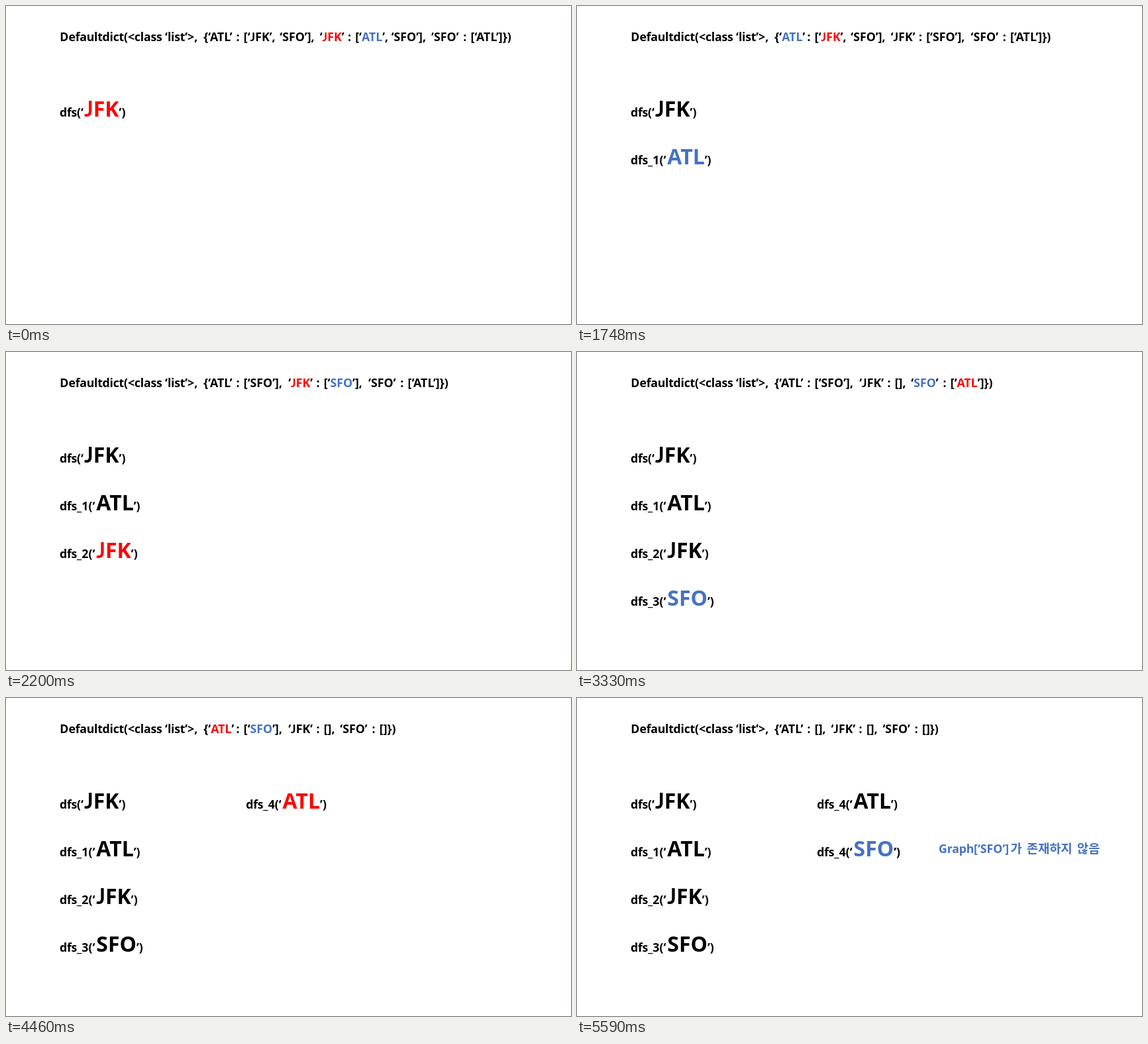
Write an HTML page with a canvas that moves like this. It is 853 px wide and 480 px high and loops after 6720 ms.

```html
<!DOCTYPE html>
<html lang="ko">
<head>
<meta charset="utf-8">
<title>DFS trace</title>
<style>
  html, body { margin: 0; width: 100%; height: 100%; overflow: hidden; background: #fff; }
  canvas { display: block; }
</style>
</head>
<body>
<canvas id="stage" width="853" height="480"></canvas>
<script>
const ctx = document.getElementById("stage").getContext("2d");
const LOOP = 6720, FIRST = 1070, STEP = 1130;
const SMALL = 17.78, BIG = 32;
const BLACK = "#000", RED = "#f00", BLUE = "#4472c4";
const INK = { "~": RED, "^": BLUE };

// "~" marks a red code and "^" a blue one.
const HEAD = "Defaultdict(<class ‘list’>, ";
const graphs = [
  "{‘ATL’ : [‘JFK’, ‘SFO’], ‘~JFK’ : [‘^ATL’, ‘SFO’], ‘SFO’ : [‘ATL’]})",
  "{‘^ATL’ : [‘~JFK’, ‘SFO’], ‘JFK’ : [‘SFO’], ‘SFO’ : [‘ATL’]})",
  "{‘ATL’ : [‘SFO’], ‘~JFK’ : [‘^SFO’], ‘SFO’ : [‘ATL’]})",
  "{‘ATL’ : [‘SFO’], ‘JFK’ : [], ‘^SFO’ : [‘~ATL’]})",
  "{‘~ATL’ : [‘^SFO’], ‘JFK’ : [], ‘SFO’ : []})",
  "{‘ATL’ : [], ‘JFK’ : [], ‘SFO’ : []})"
];

// Distance from the start of one word to the next.
const advance = {
  "Defaultdict(<class": 158.8, "‘list’>,": 58.2, "{‘ATL’": 49.2, ":": 11.3,
  "[‘JFK’,": 54.5, "[‘ATL’,": 54.5, "‘SFO’],": 60.4, "[‘SFO’],": 67.4,
  "‘JFK’": 42.2, "‘SFO’": 48.2, "[],": 24.6
};

const calls = [
  ["dfs", "JFK"], ["dfs_1", "ATL"], ["dfs_2", "JFK"],
  ["dfs_3", "SFO"], ["dfs_4", "ATL"], ["dfs_4", "SFO"]
];

// Draws a run and returns its end. Lowercase is set slightly tight;
// J takes a face whose hook rests on the baseline.
function write(text, x, y, size, color) {
  ctx.fillStyle = color;
  for (const part of text.split(/(J|[a-z]+)/)) {
    const face = part === "J" ? "Lato" : '"Open Sans", "Noto Sans"';
    ctx.font = `700 ${size}px ${face}, sans-serif`;
    ctx.letterSpacing = /[a-z]/.test(part) ? "-0.3px" : "0px";
    ctx.fillText(part, x, y);
    x += ctx.measureText(part).width;
  }
  ctx.letterSpacing = "0px";
  return x;
}

function drawGraph(text) {
  let left = 81.3;
  for (const word of (HEAD + text).split(" ")) {
    let x = left;
    for (const run of word.split(/([~^]\w+)/)) {
      const ink = INK[run[0]];
      x = write(ink ? run.slice(1) : run, x, 53, SMALL, ink || BLACK);
    }
    left += advance[word.replace(/[~^]/, "")] || 0;
  }
}

function drawCall(i, color) {
  const [name, code] = calls[i];
  const x = i < 4 ? 81 : 362.3;
  const y = 167 + 72 * (i % 4);
  write(name + "(‘", x, y, SMALL, BLACK);
  const end = write(code, x + (i ? 55.3 : 37), y, BIG, color);
  write("’)", end, y, SMALL, BLACK);
}

function drawNote() {
  const y = 234;
  write("Graph[‘SFO’]", 546, y, SMALL, BLUE);
  ctx.font = '700 18.7px "Noto Sans CJK KR", "Noto Sans CJK", sans-serif';
  [["가", 654.5], ["존재하지", 679], ["않음", 755]]
    .forEach(([word, x]) => ctx.fillText(word, x, y));
}

function draw(time) {
  const t = time % LOOP;
  const step = t < FIRST ? 0 : 1 + Math.floor((t - FIRST) / STEP);
  ctx.fillStyle = "#fff";
  ctx.fillRect(0, 0, 853, 480);
  drawGraph(graphs[step]);
  for (let i = 0; i <= step; i++) {
    drawCall(i, i < step ? BLACK : i % 2 ? BLUE : RED);
  }
  if (step === 5) drawNote();
}

const start = performance.now();
function tick() {
  draw(performance.now() - start);
  requestAnimationFrame(tick);
}
tick();
</script>
</body>
</html>
```
